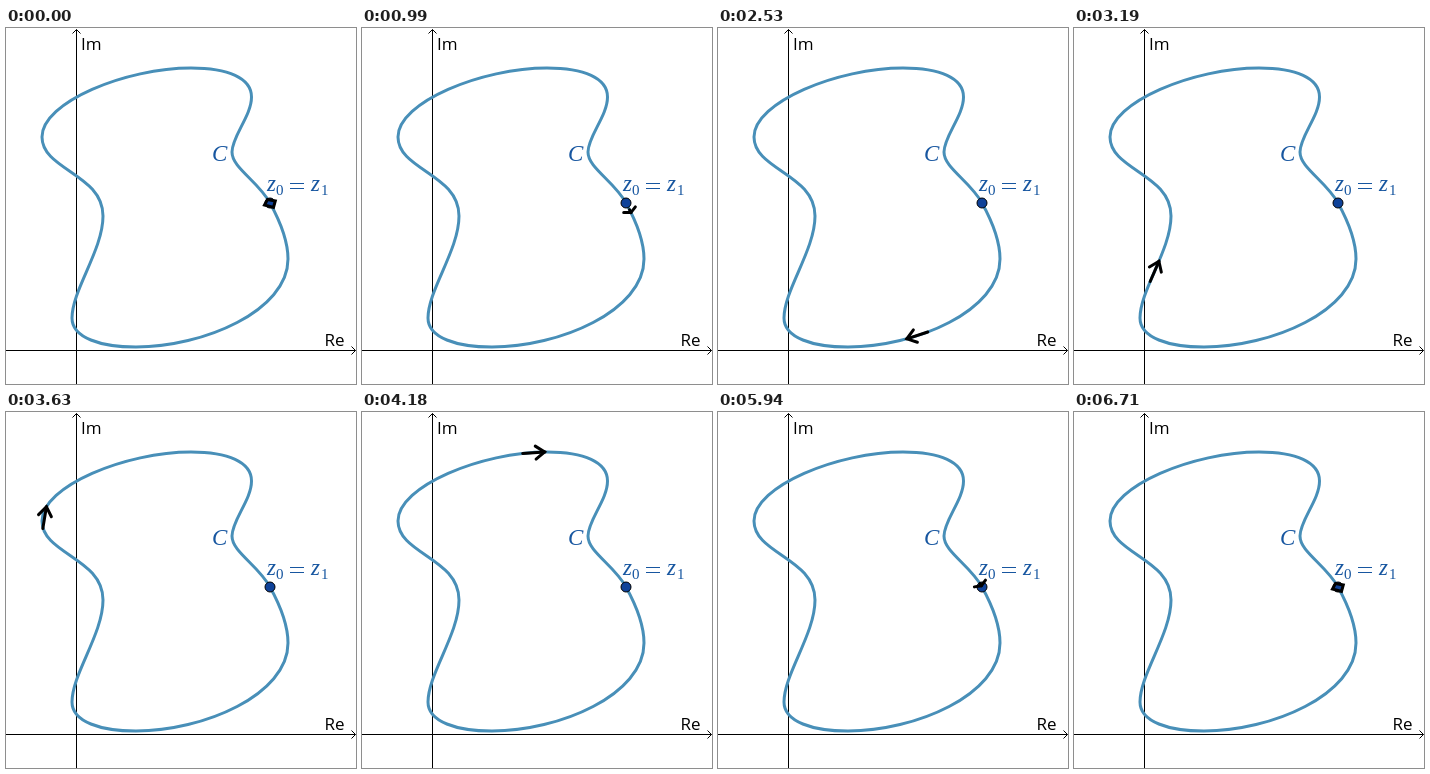
These frames come from a looping animation (350x356 px, 6820 ms). An HTML page with a canvas:

```html
<!DOCTYPE html>
<html lang="en">
<head>
<meta charset="utf-8">
<title>Closed contour</title>
<style>
  html, body { margin: 0; width: 100%; height: 100%; overflow: hidden; background: #fff; }
  canvas { display: block; }
</style>
</head>
<body>
<canvas id="stage" width="350" height="356"></canvas>
<script>
const ctx = document.getElementById('stage').getContext('2d');
const STEP = 110, STEPS = 62, MAX_LENGTH = 22;
const BLUE = '#1756a0';

const contour = 'M264 175 C272 189.5 282 212 282 231 C282 283 197 319 130 319' +
  ' C95 319 66 310 66 290 C66 262 97 222 97 188 C97 146 36 142 36 109' +
  ' C36 74 120 40 185 40 C222 40 245.5 50 245.5 69' +
  ' C245.5 88 226 108 226 124 C226 140 252 153 264 175 Z';
const outline = new Path2D(contour);
const track = document.createElementNS('http://www.w3.org/2000/svg', 'path');
track.setAttribute('d', contour);
const total = track.getTotalLength();

// Eased time to fraction of the contour's length.
const knots = [[0, 0], [.0722, .0665], [.4298, .425], [.786, .781],
  [.928, .934], [.994, .9985], [1, 1]];

function progress(u) {
  u = Math.max(0, u);
  const e = u < .5 ? 4 * u ** 3 : 1 - 4 * (1 - u) ** 3;
  let i = 1;
  while (i < knots.length - 1 && e > knots[i][0]) i++;
  const [x0, y0] = knots[i - 1], [x1, y1] = knots[i];
  return y0 + (y1 - y0) * (e - x0) / (x1 - x0);
}

function line(points, width, color, close) {
  ctx.beginPath();
  points.forEach(([x, y]) => ctx.lineTo(x, y));
  if (close) ctx.closePath();
  ctx.lineWidth = width;
  ctx.strokeStyle = color;
  ctx.stroke();
}

function text(string, x, y, font, color) {
  ctx.font = font;
  ctx.fillStyle = color;
  ctx.fillText(string, x, y);
}

function drawAxes() {
  line([[0, 322.5], [349.5, 322.5]], 1, '#000');
  line([[345.5, 318.5], [349.5, 322.5], [345.5, 326.5]], 1, '#000');
  line([[70.5, 356], [70.5, 1.5]], 1, '#000');
  line([[66.5, 5.5], [70.5, 1.5], [74.5, 5.5]], 1, '#000');
  const font = '500 17px "Open Sans", "Noto Sans", sans-serif';
  text('Im', 75, 22, font, '#000');
  text('Re', 318.5, 318, font, '#000');
}

function drawLabels() {
  const serif = '"Liberation Serif", "Noto Serif", serif';
  const italic = 'italic 23px ' + serif, small = '15px ' + serif;
  text('C', 206, 132.5, italic, BLUE);
  text('z', 261, 163, italic, BLUE);
  text('0', 270, 166.5, small, BLUE);
  line([[284, 155.5], [298, 155.5]], 1, BLUE);
  line([[284, 160.5], [298, 160.5]], 1, BLUE);
  text('z', 305, 163, italic, BLUE);
  text('1', 315, 166.5, small, BLUE);
}

function drawDot() {
  ctx.beginPath();
  ctx.arc(264, 175, 5, 0, 2 * Math.PI);
  ctx.fillStyle = '#0f4299';
  ctx.fill();
  ctx.lineWidth = 1;
  ctx.strokeStyle = '#000';
  ctx.stroke();
}

function drawArrow(step) {
  const u = step / (STEPS - 1);
  const end = progress(u) * total;
  const length = Math.min(MAX_LENGTH, end - progress(u - 1 / (STEPS - 1)) * total);
  if (length < 1) {
    line([[261.5, 171.5], [269.3, 173], [267.5, 179.5], [258.5, 177]], 3, '#000', true);
    return;
  }
  const tip = track.getPointAtLength(end);
  const tail = track.getPointAtLength(end - length);
  const angle = Math.atan2(tip.y - tail.y, tip.x - tail.x);
  const depth = Math.min(9, length);
  ctx.save();
  ctx.translate(tip.x, tip.y);
  ctx.rotate(angle);
  ctx.lineCap = 'round';
  line([[-length, 0], [0, 0]], 3, '#000');
  line([[-depth, -6.5], [0, 0], [-depth, 6.5]], 3, '#000');
  ctx.restore();
}

function draw(now) {
  ctx.clearRect(0, 0, 350, 356);
  drawAxes();
  ctx.lineWidth = 3;
  ctx.strokeStyle = '#488fb8';
  ctx.stroke(outline);
  drawLabels();
  drawDot();
  drawArrow(Math.floor(now / STEP) % STEPS);
}

const start = performance.now();
function tick() {
  draw(performance.now() - start);
  requestAnimationFrame(tick);
}
tick();
</script>
</body>
</html>
```
